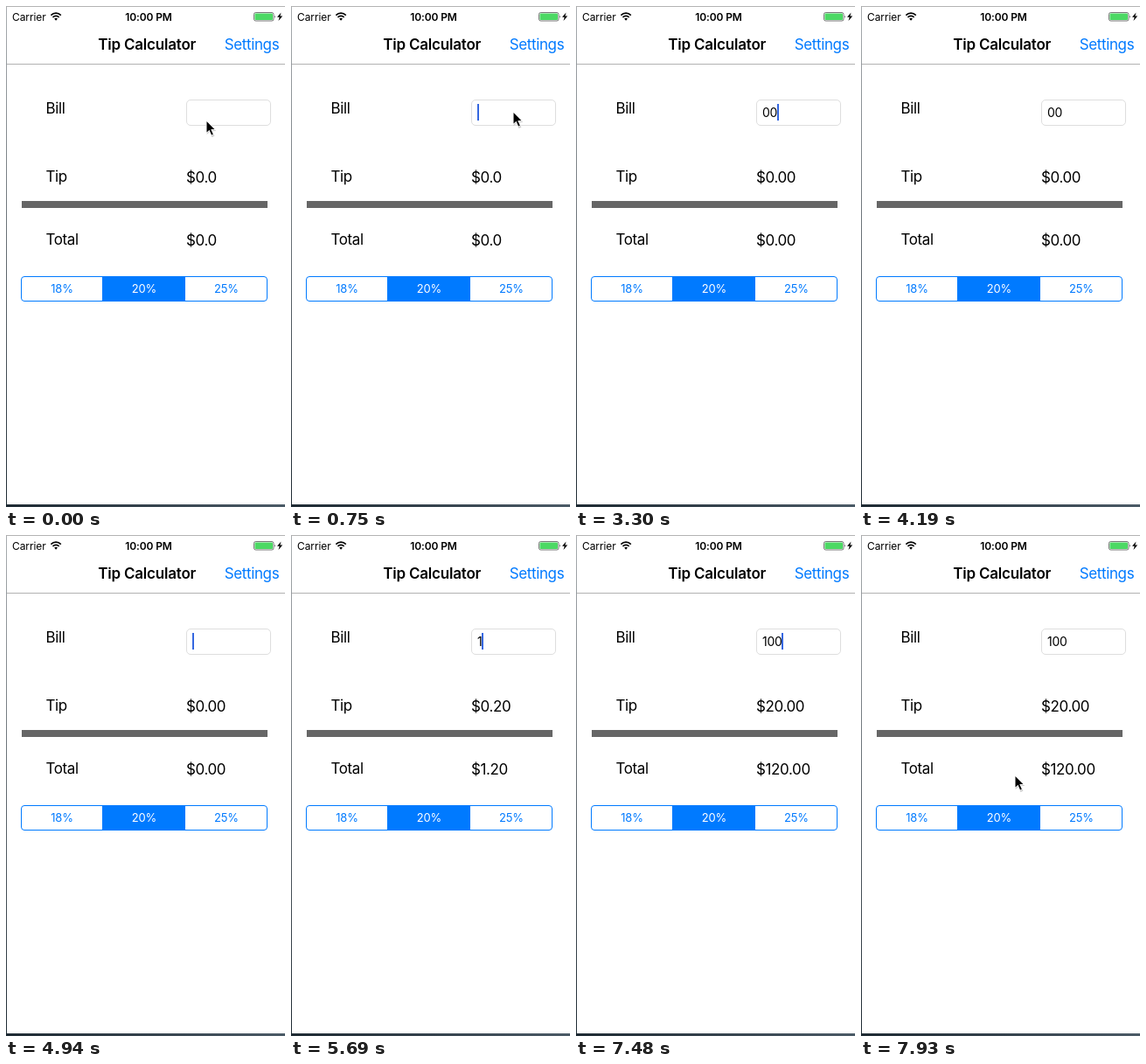
An HTML page for the animation above (8000 ms loop, 319 px wide and 573 px high).

```html
<!DOCTYPE html>
<html lang="en">
<head>
<meta charset="utf-8">
<title>Tip Calculator</title>
<style>
  html, body { margin: 0; width: 100%; height: 100%; overflow: hidden; background: #fff; }
  svg { display: block; width: 100%; height: 100%; }
  text { font: 17px Inter, sans-serif; letter-spacing: -.38px; white-space: pre; }
  .status { font-size: 12px; letter-spacing: -.1px; }
  .bold { font-weight: 600; }
  .title { letter-spacing: -.2px; }
  .mid { text-anchor: middle; }
  .blue { fill: #007aff; }
  .seg { font-size: 13px; letter-spacing: -.2px; }
  #bill { font-size: 14px; letter-spacing: -.3px; }
</style>
</head>
<body>
<svg viewBox="0 0 319 573">
  <defs>
    <linearGradient id="side" x2="0" y2="1">
      <stop stop-color="#a9adb0"/><stop offset="1" stop-color="#1e2a33"/>
    </linearGradient>
    <linearGradient id="floor">
      <stop stop-color="#1e2a33"/><stop offset="1" stop-color="#4b5a66"/>
    </linearGradient>
  </defs>

  <rect width="319" height="573" fill="#fff"/>
  <rect width="1" height="573" fill="url(#side)"/>
  <rect y="570" width="319" height="3" fill="url(#floor)"/>
  <rect width="319" height="1" fill="#b4b4b4"/>

  <text class="status" x="7" y="17">Carrier</text>
  <g fill="none" stroke="#000" stroke-width="1.7">
    <path d="M51.4 10.6a8 8 0 0 1 11.4 0M53.5 13a5 5 0 0 1 7.2 0"/>
    <path d="M55.2 14.6a2.8 2.8 0 0 1 3.8 0l-1.9 2.2z" fill="#000" stroke="none"/>
  </g>
  <text class="status bold mid" x="163" y="17">10:00 PM</text>
  <rect x="283.5" y="7.5" width="22.5" height="9.5" rx="2" fill="#fff" stroke="#555" stroke-width=".8"/>
  <rect x="284.5" y="8.5" width="20.5" height="7.5" rx="1" fill="#4cd964"/>
  <path d="M307 10.7q1.5 1.5 0 3z" fill="#333"/>
  <path d="M314.5 7.5L310 12.7h2.7l-1.2 4.3 4.7-5.5h-2.8z"/>

  <text class="bold title mid" x="161.2" y="50">Tip Calculator</text>
  <text class="blue" x="249.8" y="50">Settings</text>
  <rect x="1" y="66" width="318" height="1" fill="#b2b2b2"/>

  <text x="45.5" y="123">Bill</text>
  <text x="45.5" y="201">Tip</text>
  <text x="45.5" y="273">Total</text>
  <rect x="206.5" y="107.5" width="96" height="29" rx="4.5" fill="#fff" stroke="#dedede"/>
  <rect x="18" y="223" width="281" height="8" fill="#666"/>
  <text id="bill" x="213" y="126.5"></text>
  <text id="tip" x="206" y="201.5"></text>
  <text id="total" x="206" y="274"></text>
  <rect id="caret" y="112" width="2" height="19" fill="#3567e0"/>

  <rect x="17.5" y="309.5" width="281" height="28" rx="3.5" fill="#fff" stroke="#007aff"/>
  <rect class="blue" x="110" y="309" width="95" height="29"/>
  <text class="seg mid blue" x="64" y="328">18%</text>
  <text class="seg mid" x="158" y="328" fill="#fff">20%</text>
  <text class="seg mid blue" x="252" y="328">25%</text>

  <g id="pointer">
    <path d="M0 0V15L3.3 12 5.8 18 8.8 16.7 6.3 11H10.6z" transform="translate(.6 1)" opacity=".2"/>
    <path d="M.5 1V13.5L3.5 10.7 6 16.5 7.8 15.7 5.3 10H9.4z" stroke="#fff" stroke-width="1.6" paint-order="stroke"/>
  </g>
</svg>
<script>
  const LOOP = 8000, STEP = 150, TIP_RATE = .2;
  const [bill, tip, total, caret, pointer] =
    ["bill", "tip", "total", "caret", "pointer"].map(id => document.getElementById(id));

  // The field gains focus with the first entry; each later one is a key press.
  const edits = [[300, ""], [1800, "0"], [2100, "00"], [4490, "0"], [4940, ""],
    [5690, "1"], [6730, "10"], [7030, "100"]];
  const glides = [
    { start: 0, end: 750, from: [229, 131], to: [233, 129] },
    { start: 750, end: 1050, from: [254, 121], to: [254, 121] },
    { start: 7630, end: LOOP, from: [205, 264], to: [176, 275] },
  ];

  const clamp = value => Math.min(1, Math.max(0, value));
  const dollars = value => "$" + value.toFixed(2);

  // Four steps on, one fading, two off, one returning; typing restarts the cycle.
  const blink = age => clamp(Math.abs(Math.floor(age / STEP) % 8 - 5.5) - 1);

  function drawForm(t) {
    const [since, typed] = edits.findLast(([start]) => start <= t) ?? [Infinity, ""];
    const untouched = t < edits[1][0];
    const amount = Number(typed);
    bill.textContent = typed;
    tip.textContent = untouched ? "$0.0" : dollars(amount * TIP_RATE);
    total.textContent = untouched ? "$0.0" : dollars(amount * (1 + TIP_RATE));
    caret.setAttribute("x", 213 + Math.floor(bill.getComputedTextLength()));
    caret.setAttribute("opacity", t < since ? 0 : blink(t - since));
  }

  function drawPointer(t) {
    const glide = glides.find(({ start, end }) => start <= t && t < end);
    pointer.setAttribute("visibility", glide ? "visible" : "hidden");
    if (!glide) return;
    const progress = clamp(Math.floor((t - glide.start) / STEP) / 2);
    const place = glide.from.map((from, axis) => from + (glide.to[axis] - from) * progress);
    pointer.setAttribute("transform", `translate(${place})`);
  }

  function draw(now) {
    const t = now % LOOP;
    drawForm(t);
    drawPointer(t);
    requestAnimationFrame(draw);
  }
  requestAnimationFrame(draw);
</script>
</body>
</html>
```
